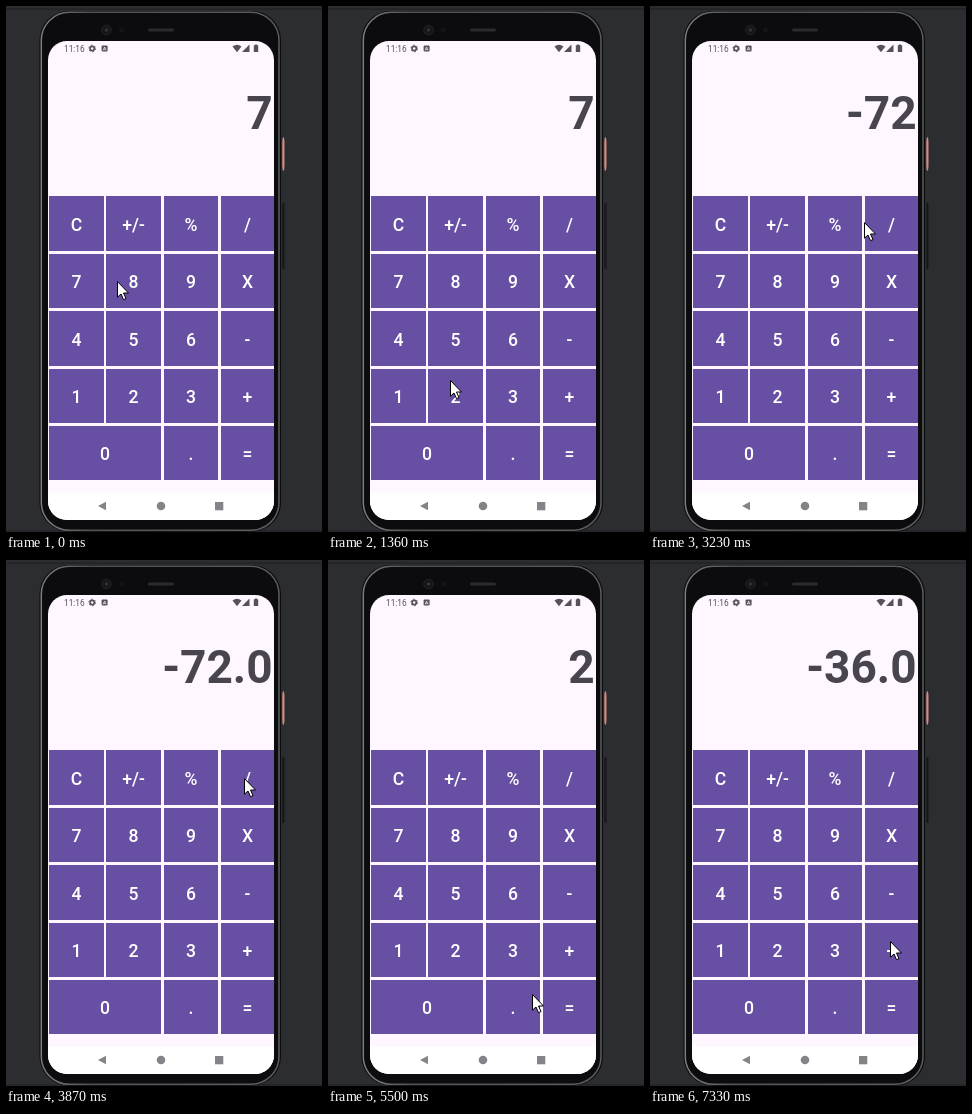
These frames come from a looping animation (316x526 px, 8000 ms). An HTML page:

```html
<!DOCTYPE html>
<html lang="en">
<head>
<meta charset="utf-8">
<title>Calculator</title>
<style>
  html, body { margin: 0; width: 100%; height: 100%; overflow: hidden; background: #2b2d30; }
  svg { display: block; }
  text { font-family: Roboto, sans-serif; }
  .keys rect { fill: #6750a4; }
  .keys text { fill: #fff; font-size: 17.6px; font-weight: 500; text-anchor: middle; }
  .results { animation: result 8s step-end infinite; }
  .results text { fill: #49454f; font-size: 46px; font-weight: 700; text-anchor: end; }
  .cursor { animation: move 8s step-end infinite; }

  /* Each result sits 60px below the previous one */
  @keyframes result {
    0% { transform: translateY(0); }
    22% { transform: translateY(-60px); }
    33.875% { transform: translateY(-120px); }
    48.375% { transform: translateY(-180px); }
    64% { transform: translateY(-240px); }
    75.5%, 100% { transform: translateY(-300px); }
  }

  @keyframes move {
    0% { transform: translate(111px, 275px); }
    1.5% { transform: translate(113px, 275px); }
    10.625% { transform: translate(125px, 281px); }
    12.125% { transform: translate(135px, 300px); }
    13.625% { transform: translate(131px, 331px); }
    15.125% { transform: translate(123px, 354px); }
    17% { transform: translate(122px, 374px); }
    24% { transform: translate(122px, 325px); }
    25.5% { transform: translate(122px, 261px); }
    27.375% { transform: translate(122px, 251px); }
    28.875% { transform: translate(120px, 226px); }
    30.75% { transform: translate(120px, 212px); }
    38.875% { transform: translate(172px, 213px); }
    40.375% { transform: translate(214px, 216px); }
    42.125% { transform: translate(231px, 217px); }
    43.625% { transform: translate(238px, 218px); }
    51.875% { transform: translate(181px, 321px); }
    53.75% { transform: translate(156px, 358px); }
    55.375% { transform: translate(144px, 373px); }
    57.25% { transform: translate(133px, 391px); }
    58.875% { transform: translate(128px, 397px); }
    67.25% { transform: translate(155px, 416px); }
    68.75% { transform: translate(204px, 434px); }
    70.25% { transform: translate(231px, 439px); }
    72.125% { transform: translate(238px, 440px); }
    82.75% { transform: translate(238px, 437px); }
    84.5% { transform: translate(243px, 389px); }
    86.25% { transform: translate(244px, 367px); }
    88% { transform: translate(244px, 366px); }
    89.75% { transform: translate(241px, 374px); }
    91.625%, 100% { transform: translate(240px, 381px); }
  }
</style>
</head>
<body>
<svg width="316" height="526" viewBox="0 0 316 526">
  <defs>
    <clipPath id="screen"><rect x="42" y="35" width="226" height="479" rx="19"/></clipPath>
    <linearGradient id="rim" x2="1" y2="0">
      <stop offset="0" stop-color="#7c7d7e"/>
      <stop offset=".2" stop-color="#505152"/>
      <stop offset="1" stop-color="#5c5d5e"/>
    </linearGradient>
  </defs>

  <rect width="316" height="526" fill="#2b2d30"/>
  <path d="M0 3H316M0 525H316" stroke="#1e1f22"/>

  <!-- Phone body -->
  <rect x="276.300" y="131" width="2.200" height="34" rx="1.100" ry="6" fill="#d58a83"/>
  <rect x="276.300" y="197" width="2.200" height="66" rx="1" fill="#17181a"/>
  <rect x="33.500" y="5" width="241.500" height="520.500" rx="29" fill="#0b0b0c"/>
  <rect x="35.300" y="6.300" width="237.700" height="518" rx="28" fill="#0c0c0e" stroke="url(#rim)" stroke-width="1.500"/>
  <circle cx="100.500" cy="24" r="4.800" fill="#141618" stroke="#222427"/>
  <circle cx="100.500" cy="24" r="1.800" fill="#2d3238"/>
  <circle cx="115.500" cy="24" r="2.500" fill="#131416"/>
  <rect x="142" y="22.500" width="26" height="3" rx="1.500" fill="#2a2b2d"/>

  <g clip-path="url(#screen)">
    <rect x="42" y="35" width="226" height="479" fill="#fef7ff"/>
    <rect x="42" y="486.500" width="226" height="28" fill="#fff"/>

    <!-- Status bar -->
    <g fill="#55525a">
      <text x="58" y="45.700" font-size="8.300">11:16</text>
      <circle cx="86.200" cy="42.500" r="2.100" fill="none" stroke="#55525a" stroke-width="1.700"/>
      <circle cx="86.200" cy="42.500" r="3.300" fill="none" stroke="#55525a" stroke-width="1" stroke-dasharray="1.730"/>
      <rect x="95.600" y="39.500" width="6" height="6" rx="1"/>
      <path d="M97.200 44.300L98.600 41L100 44.300M97.700 43.300H99.500" fill="none" stroke="#fef7ff" stroke-width=".7"/>
      <path d="M226.500 40.500Q231 37 235.500 40.500L231 46.200Z"/>
      <path d="M243.500 38.500V46H236Z"/>
      <path d="M247.800 39.300H249V38.500H251V39.300H252.200V46H247.800Z"/>
    </g>

    <svg x="42" y="80" width="226" height="56" overflow="hidden">
      <g class="results"></g>
    </svg>
    <g class="keys"></g>

    <g fill="#858387">
      <path d="M92 500L100 495.700V504.300Z"/>
      <circle cx="155" cy="500" r="4.300"/>
      <rect x="209" y="496" width="8.300" height="8.300"/>
    </g>
  </g>

  <path class="cursor" d="M.5 .6V16.200L4 13L6.500 18.700L9 17.600L6.500 12H11.500Z"
        fill="#fff" stroke="#000" stroke-width="1" stroke-linejoin="round"/>
</svg>
<script>
  const add = (parent, name, attrs, text = '') => {
    const el = document.createElementNS('http://www.w3.org/2000/svg', name);
    for (const key in attrs) el.setAttribute(key, attrs[key]);
    el.textContent = text;
    parent.append(el);
  };

  const results = document.querySelector('.results');
  ['7', '72', '-72', '-72.0', '2', '-36.0'].forEach((value, i) =>
    add(results, 'text', { x: 224.6, y: 43 + i * 60 }, value));

  // Key edges snap to whole pixels
  const keys = document.querySelector('.keys');
  const size = 54.4, pitchX = 57.3, pitchY = 57.4, right = 268;
  const rows = ['C +/- % /', '7 8 9 X', '4 5 6 -', '1 2 3 +', '0 . ='];
  rows.forEach((row, r) => {
    const top = 190.3 + r * pitchY;
    const y = Math.round(top), height = Math.round(top + size) - y;
    let left = 43.1;
    for (const label of row.split(' ')) {
      const span = label === '0' ? pitchX : 0;
      const x = Math.round(left);
      const width = Math.min(right, Math.round(left + size + span)) - x;
      add(keys, 'rect', { x, y, width, height });
      add(keys, 'text', { x: x + width / 2, y: Math.round(y + height / 2 + 7) }, label);
      left += pitchX + span;
    }
  });
</script>
</body>
</html>
```
